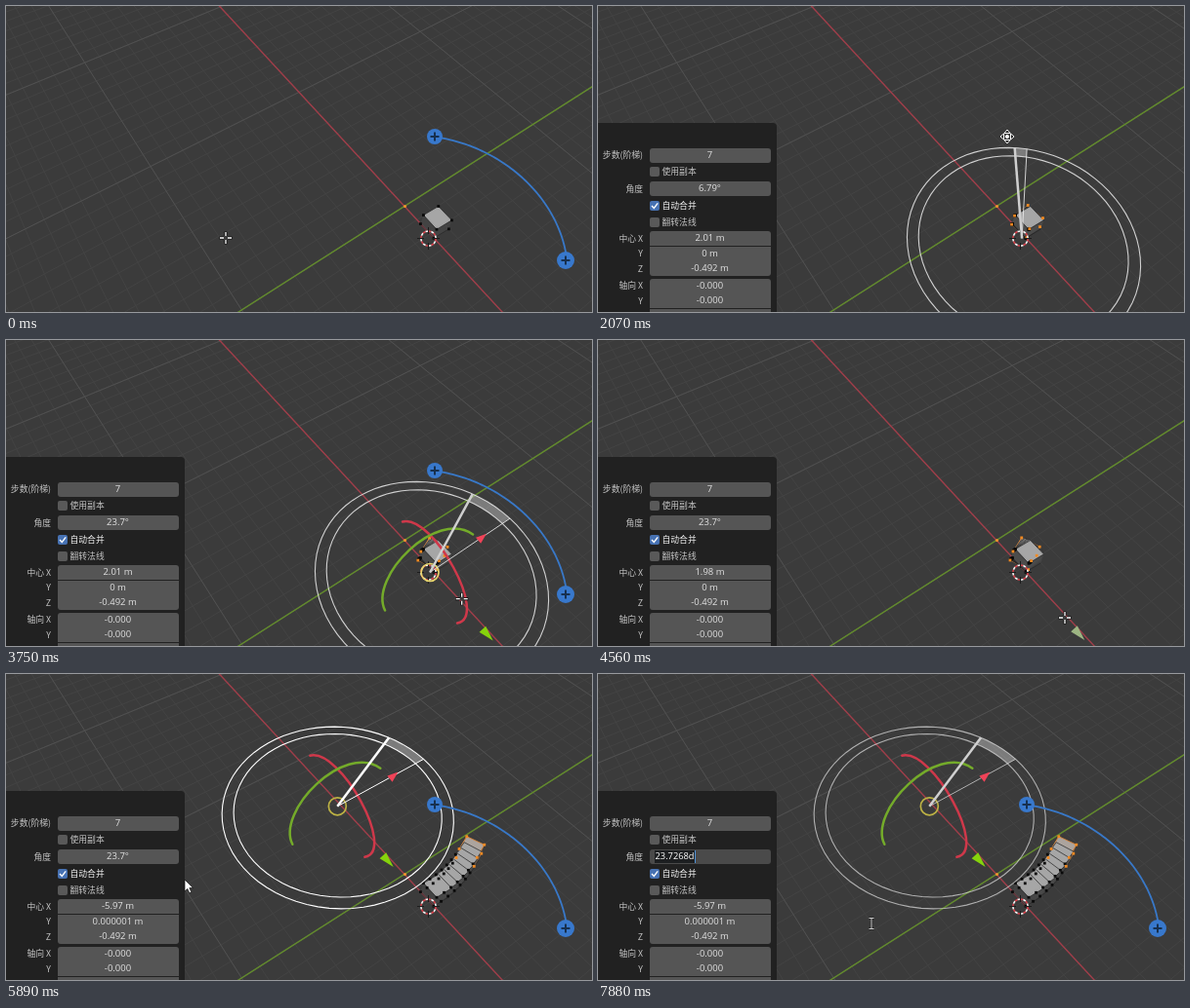
An HTML page with a canvas that plays this animation: 600x314 px, repeating every 8000 ms.

```html
<!DOCTYPE html>
<html lang="zh">
<head>
<meta charset="utf-8">
<title>Spin tool</title>
<style>
html, body { margin: 0; width: 100%; height: 100%; overflow: hidden; background: #3b3b3b; }
#stage { position: relative; width: 600px; height: 314px; overflow: hidden; }
canvas, svg { position: absolute; left: 0; top: 0; }
#panel {
  position: absolute; left: 0; top: 120px; width: 183px; height: 200px;
  background: #212121; border-radius: 0 4px 0 0; color: #c4c4c4;
  font: 8.8px/16px "Noto Sans CJK SC", "Noto Sans CJK", "Noto Sans", sans-serif;
}
#panel > * { position: absolute; white-space: nowrap; }
.label { right: 137px; }
.field {
  left: 52.5px; width: 124px; height: 15px; line-height: 14.5px; background: #555;
  border-radius: 3px; color: #e2e2e2; text-align: center;
  font-family: "Open Sans", "Noto Sans", sans-serif; font-size: 9.5px;
}
.field.edit { background: #4a4a4a; text-align: left; color: #fff; }
.field.edit span {
  display: inline-block; height: 13px; line-height: 12.5px; margin: 1px 0 0 5.5px; padding-left: .5px;
  vertical-align: top; background: #1d1f21; border-right: 1px solid #4f93d8; font-size: 9.3px;
}
.first { border-radius: 3px 3px 0 0; }
.middle { border-radius: 0; }
.last { border-radius: 0 0 3px 3px; }
.box { left: 53px; width: 10px; height: 10px; border-radius: 2px; background: #595959; }
.box.on { background: #4772b3; }
.box svg { width: 10px; height: 10px; }
.option { left: 65.5px; }
.bright { color: #f2f2f2; }
</style>
</head>
<body>
<div id="stage">
  <canvas id="view" width="600" height="314"></canvas>
  <div id="panel"></div>
  <svg id="pointer" width="600" height="314" fill="none">
    <g id="cross">
      <path d="M-6.5 0h4.5M2 0h4.5M0-6.5v4.5M0 2v4.5" stroke="#111" stroke-width="3"/>
      <path d="M-6 0h4M2 0h4M0-6v4M0 2v4" stroke="#fff" stroke-width="1.3"/>
    </g>
    <g id="move" fill="#151515" stroke="#fff">
      <path d="M0-7l3 3.5h-6zM0 7l3-3.5h-6zM-7 0l3.5-3v6zM7 0l-3.5-3v6z"/>
      <circle r="1.6" fill="#fff"/>
    </g>
    <path id="arrow" d="M0 0v12l2.8-2.6 2 4.4 2-1-2-4.2h3.8z" fill="#fff" stroke="#111" stroke-width=".7"/>
    <path id="slide" d="M-8 0l4-3.5v2.5h8v-2.5l4 3.5-4 3.5v-2.5h-8v2.5z" fill="#fff" stroke="#111" stroke-width=".8"/>
    <g id="beam">
      <path d="M-2.5-5.5h5M-2.5 5.5h5M0-5.5v11" stroke="#222" stroke-width="2.4"/>
      <path d="M-2.5-5.5h5M-2.5 5.5h5M0-5.5v11" stroke="#ccc"/>
    </g>
  </svg>
</div>
<script>
const LOOP = 8000, STEPS = 7, TAU = Math.PI * 2, RAD = Math.PI / 180;
const view = document.getElementById('view');
const ctx = view.getContext('2d');
const panel = document.getElementById('panel');

// Each row: time, then the values reached at that time.
const pointerKeys = [
  [530, 225, 238], [800, 330, 285], [930, 440, 307], [1000, 530, 287], [1040, 558, 245],
  [1100, 503, 200], [1170, 503, 200], [1240, 439, 136], [1340, 439, 136], [1550, 436, 143],
  [1690, 422, 136], [1860, 422, 135], [2070, 419, 134], [2150, 419, 134], [2660, 396, 141],
  [2810, 394, 142], [3160, 394, 142], [3810, 474, 278], [4100, 500, 302], [4420, 478, 285],
  [4640, 478, 285], [5360, 386, 184], [5410, 385, 183], [5690, 385, 183], [5890, 183, 211],
  [5940, 183, 211], [6290, 130, 190], [7060, 130, 190], [7220, 126, 188], [7500, 134, 187],
  [7640, 134, 187], [7880, 280, 256]];
const angleKeys = [[1860, .5], [2070, 6.79], [2150, 6.79], [2660, 22.9], [2810, 23.7268]];
const centerKeys = [[4500, 2.01], [4560, 1.98], [4640, 1.98], [5360, -5.85], [5410, -5.97]];
const shapes = [[0, 'cross'], [1690, 'move'], [3160, 'cross'], [5850, 'arrow'], [6240, 'slide'], [7060, 'beam']];

function sample(keys, t) {
  const next = keys.findIndex(k => k[0] > t);
  if (next === 0) return keys[0].slice(1);
  if (next < 0) return keys[keys.length - 1].slice(1);
  const a = keys[next - 1], b = keys[next], f = (t - a[0]) / (b[0] - a[0]);
  return a.slice(1).map((v, i) => v + (b[i + 1] - v) * f);
}

// Ground plane in metres to screen pixels.
const depth = (x, y) => 1 - .01692 * x + .0118 * y;
function project(x, y, dx = 0, dy = 0) {
  const w = depth(x, y);
  return [(408 + 5.724 * x + 19.517 * y) / w + dx, (205.5 + 10.21 * x - 6.96 * y) / w + dy];
}
// Point on a circle around a pivot on the X axis, just below the ground.
const onCircle = (cx, radius, deg) =>
  project(cx + radius * Math.cos(deg * RAD), radius * Math.sin(deg * RAD), -.2, 4.5);
const sweep = (cx, radius, from, to) =>
  Array.from({ length: 73 }, (_, i) => onCircle(cx, radius, from + (to - from) * i / 72));

function trace(c, points, closed) {
  c.beginPath();
  points.forEach(p => c.lineTo(p[0], p[1]));
  if (closed) c.closePath();
}
function line(points, color, width = 1, c = ctx) {
  trace(c, points);
  c.strokeStyle = color;
  c.lineWidth = width;
  c.stroke();
}
function fill(points, color) {
  trace(ctx, points, true);
  ctx.fillStyle = color;
  ctx.fill();
}
function disc(x, y, r, color) {
  ctx.beginPath();
  ctx.arc(x, y, r, 0, TAU);
  ctx.fillStyle = color;
  ctx.fill();
}
function stroke(path, color, width) {
  ctx.strokeStyle = color;
  ctx.lineWidth = width;
  ctx.stroke(new Path2D(path));
}

function makeGround() {
  const c = document.createElement('canvas');
  c.width = 600;
  c.height = 314;
  const g = c.getContext('2d');
  g.fillStyle = '#3b3b3b';
  g.fillRect(0, 0, 600, 314);
  const grid = (step, color) => {
    for (let n = -40; n <= 40; n += step) {
      if (n <= 20) line([project(n, -30), project(n, 40)], color, 1, g);
      if (n >= -30) line([project(-40, n), project(20, n)], color, 1, g);
    }
  };
  grid(1, '#434343');
  grid(10, '#505050');
  line([project(0, -30), project(0, 40)], '#628b2c', 1.4, g);
  line([project(-40, 0), project(20, 0)], '#a03d49', 1.4, g);
  return c;
}
const ground = makeGround();

function makeBlock(turn, cx) {
  const cos = Math.cos(turn), sin = Math.sin(turn);
  const corner = (x, y, dx, dy) => {
    const rx = x - cx, sx = cx + rx * cos - y * sin, sy = rx * sin + y * cos;
    return project(sx + .05 * sy, sy, dx, dy);
  };
  const base = [[1.5, 0], [2.5, 0], [2.5, 1], [1.5, 1]];
  return {
    top: base.map(p => corner(...p, 0, -12)),
    low: base.map(p => corner(...p, -3, -3))
  };
}
function drawFaces({ top, low }, selected) {
  const edge = selected ? '#d9853a' : 'rgba(35,35,35,.8)';
  for (const i of [0, 1]) {
    fill([top[i], top[i + 1], low[i + 1], low[i]], selected ? 'rgba(150,110,80,.4)' : 'rgba(75,75,75,.5)');
    line([low[i], low[i + 1]], edge, .7);
  }
  fill(top, selected ? '#aca49e' : '#a6a6a6');
  line([...top, top[0]], edge, .9);
}
function drawDots({ top, low }, selected, all) {
  const dots = all ? [...top, ...low.slice(0, 3)] : [top[0], top[1], low[0], low[1]];
  ctx.fillStyle = selected ? '#f28a22' : '#0a0a0a';
  dots.forEach(([x, y]) => ctx.fillRect(x - 1.4, y - 1.4, 2.8, 2.8));
}
function drawMesh(t, angle, cx) {
  const last = t < 1860 ? 0 : STEPS;
  const blocks = Array.from({ length: last + 1 }, (_, k) => makeBlock(angle * RAD * k / STEPS, cx));
  if (!last) blocks[0] = makeBlock(0, cx);
  const selected = k => k === last && t >= 370;
  for (let k = last; k >= 0; k--) drawFaces(blocks[k], selected(k));
  blocks.forEach((block, k) => drawDots(block, selected(k), k === last));
}

function drawSceneCursor() {
  ctx.lineWidth = 1.5;
  for (let i = 0; i < 16; i++) {
    ctx.beginPath();
    ctx.arc(432.5, 238.5, 7.6, i * TAU / 16, (i + 1) * TAU / 16);
    ctx.strokeStyle = i % 2 ? '#f4f4f4' : '#d8404a';
    ctx.stroke();
  }
  stroke('M421 238.5h7M437 238.5h7M432.5 227v7M432.5 243v7', '#1c1c1c', 1);
}

function drawHandles() {
  line(sweep(2.01, 6.8, 134, 46), '#3878c8', 1.8);
  for (const [x, y, r] of [[439, 134, 8], [573, 261, 9]]) {
    disc(x, y, r, '#3878cc');
    stroke(`M${x - 4.5} ${y}h9M${x} ${y - 4.5}v9`, '#17304f', 2);
  }
}

function cone([x, y], toward, length, half, color) {
  const c = Math.cos(toward), s = Math.sin(toward), l = length / 2;
  fill([[x + c * l, y + s * l], [x - c * l - s * half, y - s * l + c * half],
        [x - c * l + s * half, y - s * l - c * half]], color);
}

function drawGizmo(t, angle, cx) {
  const radius = 6.1 * depth(cx, 0), inner = radius * .9;
  const pivot = onCircle(cx, 0, 0);
  const axisArrow = color => cone(onCircle(cx, radius * .69, 0), .83, 16, 4.5, color);

  const dialing = t < 3090, sliding = t >= 4560 && t < 5730;
  if (sliding) return axisArrow('#9db583');

  const bright = t >= 5730 && t < 6000;
  const white = bright ? '#fff' : t < 4560 ? 'rgba(235,235,235,.85)' : 'rgba(225,225,225,.7)';
  const start = dialing ? 135 : 90, end = start + angle;
  if (!dialing) {
    const [px, py] = pivot;
    ctx.save();
    ctx.translate(px, py);
    ctx.lineCap = 'round';
    stroke('M-28-52C3-60 61 46 28 52', '#cf384a', 2.5);
    stroke('M-46 39C-63 5 7-66 44-39', '#74ab2a', 2.5);
    ctx.restore();
    ctx.beginPath();
    ctx.arc(px, py, 9, 0, TAU);
    ctx.strokeStyle = t < 4560 ? '#e9d56c' : '#bdb244';
    ctx.lineWidth = 1.7;
    ctx.stroke();
  }
  for (const r of [radius, inner]) line(sweep(cx, r, 0, 360), white, 1.1);
  fill([...sweep(cx, radius, start, end), ...sweep(cx, inner, end, start)], 'rgba(220,220,220,.4)');
  line([pivot, onCircle(cx, radius, start)], white, 1);
  line([pivot, onCircle(cx, radius, end)], bright ? '#fff' : '#cfcfcf', 2.5);
  if (!dialing) {
    cone(onCircle(cx, radius * .64, 90), -.7, 11, 4, '#f04358');
    axisArrow('#86d30c');
  }
}

function add(cls, top, html = '') {
  const node = document.createElement('div');
  node.className = cls;
  node.style.top = top - 120 + 'px';
  node.innerHTML = html;
  panel.append(node);
  return node;
}
function row(label, middle, value, cls = '') {
  add('label', middle - 8, label);
  return add('field ' + cls, middle - 7.5, value);
}
function option(text, middle, on) {
  const tick = '<svg fill="none"><path d="M2 5l2.3 2.4L8.2 2.4" stroke="#fff" stroke-width="1.4"/></svg>';
  add(on ? 'box on' : 'box', middle - 5, on ? tick : '');
  add(on ? 'option bright' : 'option', middle - 8, text);
}
row('步数(阶梯)', 153, '7');
option('使用副本', 170);
const angleField = row('角度', 187.5, '');
option('自动合并', 204.5, true);
option('翻转法线', 221.5);
const centerX = row('中心 X', 238.8, '', 'first');
const centerY = row('Y', 254.3, '', 'middle');
row('Z', 269.8, '-0.492 m', 'last');
row('轴向 X', 287.3, '-0.000', 'first');
row('Y', 302.8, '-0.000', 'middle');
row('Z', 318.3, '1.000', 'last');

function setText(node, html) {
  if (node.dataset.shown !== html) node.innerHTML = node.dataset.shown = html;
}
function updatePanel(t, angle, cx) {
  panel.style.display = t >= 1860 ? '' : 'none';
  const editing = t >= 7060;
  angleField.classList.toggle('edit', editing);
  setText(angleField, editing ? `<span>${angle.toFixed(4)}d</span>` : angle.toPrecision(3) + '°');
  setText(centerX, cx.toPrecision(3) + ' m');
  setText(centerY, t > 4700 ? '0.000001 m' : '0 m');
}

function updatePointer(t) {
  const [x, y] = sample(pointerKeys, t);
  const active = shapes.filter(s => s[0] <= t).pop()[1];
  for (const [, id] of shapes) {
    const node = document.getElementById(id);
    node.style.display = id === active ? '' : 'none';
    node.setAttribute('transform', `translate(${x} ${y})`);
  }
}

function render(t) {
  const [angle] = sample(angleKeys, t), [cx] = sample(centerKeys, t);
  ctx.drawImage(ground, 0, 0);
  drawMesh(t, angle, cx);
  disc(408.5, 205.5, 1.6, '#f0942e');
  drawSceneCursor();
  if (t >= 1860) drawGizmo(t, angle, cx);
  if (t < 1860 || (t >= 3090 && t < 4560) || t >= 5730) drawHandles();
  updatePanel(t, angle, cx);
  updatePointer(t);
}

const began = performance.now();
function tick() {
  render((performance.now() - began) % LOOP);
  requestAnimationFrame(tick);
}
tick();
</script>
</body>
</html>
```
